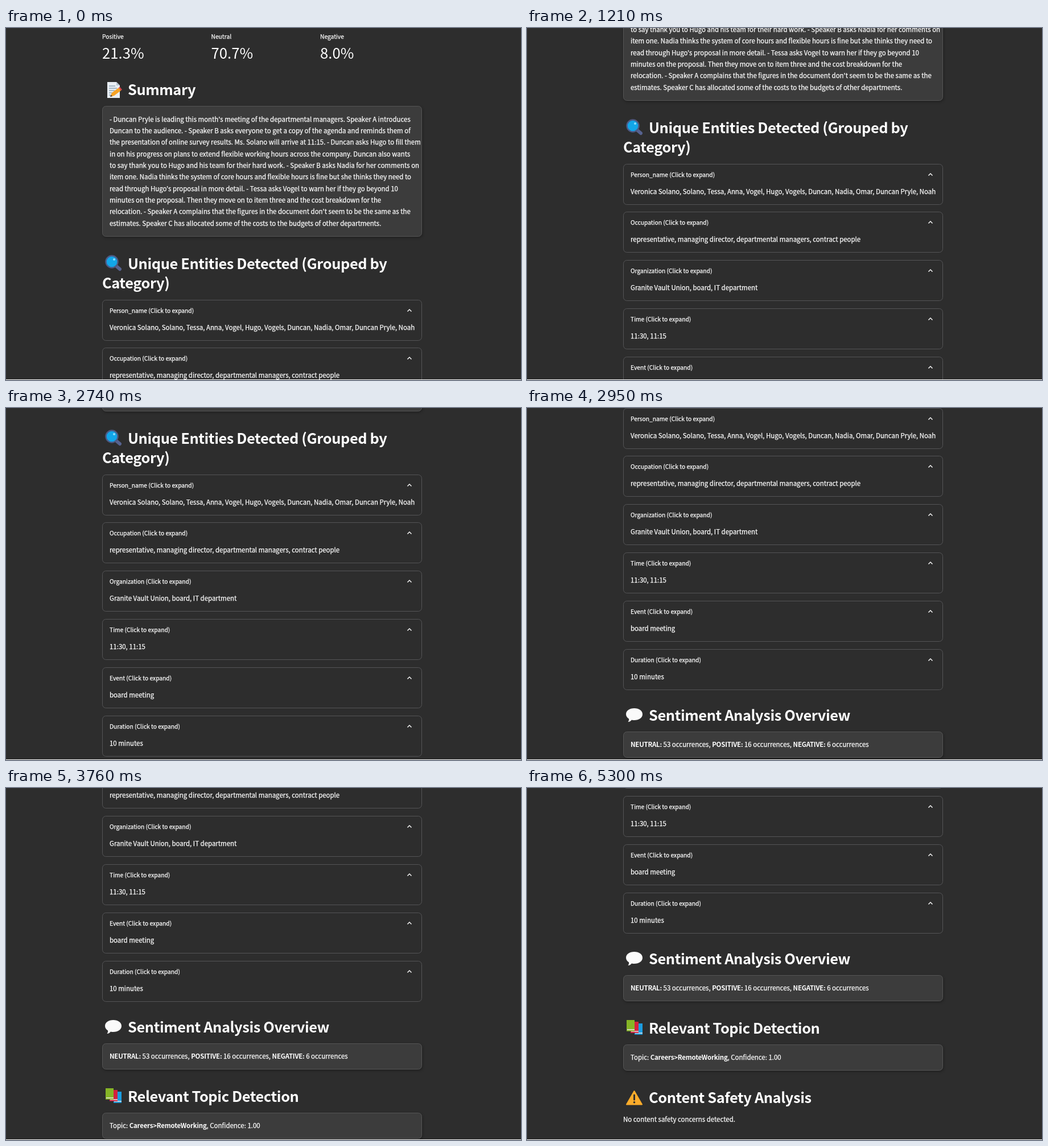
Animation, 905 px wide and 619 px high, one loop 5760 ms. Source, as an HTML page:

```html
<!DOCTYPE html>
<html lang="en">
<head>
<meta charset="utf-8">
<title>Meeting analysis</title>
<style>
  html, body { margin: 0; width: 100%; height: 100%; overflow: hidden; background: #2d2d2d; }
  svg { display: block; width: 905px; height: 619px; }
  text { fill: #fff; font-family: "Noto Sans CJK JP", "Noto Sans CJK SC", "Noto Sans CJK", "Open Sans", sans-serif; white-space: pre; }
  .label, .body { stroke: #fff; stroke-width: .25px; }
  .label { font-size: 10.25px; }
  .body { font-size: 11.45px; }
  .value { font-size: 25.7px; }
  .title { font-size: 25.4px; font-weight: 600; letter-spacing: -.016em; }
  .bold { font-weight: 700; stroke: none; letter-spacing: -.018em; }
  .panel { fill: #3c3c3c; stroke: #555; filter: drop-shadow(1px 2px 2px rgba(0, 0, 0, .3)); }
  .expander { fill: none; stroke: #545456; }
</style>
</head>
<body>
<svg viewBox="0 0 905 619">
  <g id="page"></g>
  <rect y="618" width="905" height="1" fill="#fff"/>
</svg>
<script>
const page = document.getElementById('page');
const text = (kind, x, y, s) => `<text class="${kind}" x="${x}" y="${y}">${s}</text>`;
const box = (kind, y, h) => `<rect class="${kind}" x="169.5" y="${y + .5}" width="561" height="${h}" rx="6"/>`;
const bold = s => `<tspan class="bold">${s}</tspan>`;
const at = (y, art) => `<g transform="translate(174 ${y})">${art}</g>`;

// Icons fill a 30 x 30 square
const memo = `<path d="M4 1H20L26 7V29H4Z" fill="#e9eef3"/><path d="M20 1V7H26Z" fill="#b9c6d2"/>
  <path d="M7 8H18M7 12H21M7 16H17M7 20H13M7 24H11" stroke="#8fa6b8" stroke-width="1.5"/>
  <path d="M9 27L12 20L24 11L28 16L16 25Z" fill="#f7a325"/><path d="M24 11L26 9.5L30 14.5L28 16Z" fill="#d9434e"/>
  <path d="M9 27L10.5 23.5L13 26Z" fill="#453b3b"/>`;
const lens = `<path d="M19 20L26 26" stroke="#56628f" stroke-width="6" stroke-linecap="round"/>
  <circle cx="12" cy="13" r="10.5" fill="#12a5e8" stroke="#4d5a86" stroke-width="2.4"/>
  <circle cx="16" cy="9" r="2" fill="#8be0ff"/>`;
const bubble = `<path d="M14.5 3C23 3 29 7.5 29 13.5S23 24 14.5 24C13 24 11.5 24 10 23.5C8 26 6 27 3.5 27C5 25 5.5 23 5 21.5C2 19.5 0 17 0 13.5C0 7.5 6 3 14.5 3Z" fill="#fafafa"/>`;
const book = (x, y, color) => `<path d="M${x} ${y}h14v19h-14Z" fill="${color}"/>
  <path d="M${x + 1} ${y + 17}h13" stroke="#e8e8e8" stroke-width="1.5"/><path d="M${x} ${y + 19}h14" stroke="${color}" stroke-width="1.5"/>`;
const books = book(15, 7, '#1b9de0') + book(8, 4, '#d3213d') + book(1, 1, '#86b526');
const warning = `<path d="M14.5 3L28 26.5H1Z" fill="#fbac2b" stroke="#fbac2b" stroke-width="2" stroke-linejoin="round"/>
  <path d="M14.5 10V18" stroke="#33302e" stroke-width="3" stroke-linecap="round"/><circle cx="14.5" cy="22.8" r="1.8" fill="#33302e"/>`;

const metrics = [['Positive', '21.3%'], ['Neutral', '70.7%'], ['Negative', '8.0%']];
const summary = [
  "- Duncan Pryle is leading this month's meeting of the departmental managers. Speaker A introduces",
  'Duncan to the audience. - Speaker B asks everyone to get a copy of the agenda and reminds them of',
  'the presentation of online survey results. Ms. Solano will arrive at 11:15. - Duncan asks Hugo to fill them',
  'in on his progress on plans to extend flexible working hours across the company. Duncan also wants',
  'to say thank you to Hugo and his team for their hard work. - Speaker B asks Nadia for her comments on',
  'item one. Nadia thinks the system of core hours and flexible hours is fine but she thinks they need to',
  "read through Hugo's proposal in more detail. - Tessa asks Vogel to warn her if they go beyond 10",
  'minutes on the proposal. Then they move on to item three and the cost breakdown for the',
  "relocation. - Speaker A complains that the figures in the document don't seem to be the same as the",
  'estimates. Speaker C has allocated some of the costs to the budgets of other departments.'
];
const entities = [
  ['Person_name', 'Veronica Solano, Solano, Tessa, Anna, Vogel, Hugo, Vogels, Duncan, Nadia, Omar, Duncan Pryle, Noah'],
  ['Occupation', 'representative, managing director, departmental managers, contract people'],
  ['Organization', 'Granite Vault Union, board, IT department'],
  ['Time', '11:30, 11:15'],
  ['Event', 'board meeting'],
  ['Duration', '10 minutes']
];

const expander = ([name, list], i) => {
  const y = Math.floor(478 + i * 84.8);
  return box('expander', y, 71) + text('label', 182, y + 23, name + ' (Click to expand)') +
    text('body', 182, y + 52.5, list) +
    `<path d="M705.5 ${y + 20.5}l3.5 -3.5l3.5 3.5" fill="none" stroke="#fff" stroke-width="1.4"/>`;
};

page.innerHTML = [
  ...metrics.map(([name, value], i) =>
    text('label', 169 + i * 191.5, 19, name) + text('value', 169 + i * 191.5, 54, value)),
  at(94, memo), text('title', 214, 118, 'Summary'),
  box('panel', 137, 229),
  ...summary.map((s, i) => text('body', 182, 164.5 + i * 20.36, s)),
  at(398, lens), text('title', 214, 424, 'Unique Entities Detected (Grouped by'),
  text('title', 169, 458, 'Category)'),
  ...entities.map(expander),
  at(1003, bubble), text('title', 214, 1028, 'Sentiment Analysis Overview'),
  box('panel', 1047, 45),
  text('body', 182, 1074, `${bold('NEUTRAL:')} 53 occurrences, ${bold('POSITIVE:')} 16 occurrences, ${bold('NEGATIVE:')} 6 occurrences`),
  at(1125, books), text('title', 214, 1150, 'Relevant Topic Detection'),
  box('panel', 1169, 45),
  text('body', 182, 1196, `Topic: ${bold('Careers&gt;RemoteWorking')}, Confidence: 1.00`),
  at(1248, warning), text('title', 214, 1272, 'Content Safety Analysis'),
  text('body', 169, 1305, 'No content safety concerns detected.')
].join('');

// Each wheel move: start, step length (ms), wheel notches, easing already done at the first step
const notch = 119.6;
const moves = [[1000, 70, 2, .12], [1610, 66.6, 1, .12], [2740, 70, 1, .074], [3550, 70, 1, .186], [4220, 70, 1, .35]];
const ease = x => x * x * (3 - 2 * x);

function scrollAt(t) {
  let y = 0;
  for (const [start, step, notches, phase] of moves) {
    if (t < start) break;
    const x = Math.min(1, phase + Math.floor((t - start) / step) / 3);
    y += notch * notches * ease(x);
  }
  return Math.round(y);
}

function draw() {
  page.setAttribute('transform', `translate(0 ${-scrollAt(performance.now() % 5760)})`);
  requestAnimationFrame(draw);
}
draw();
</script>
</body>
</html>
```
